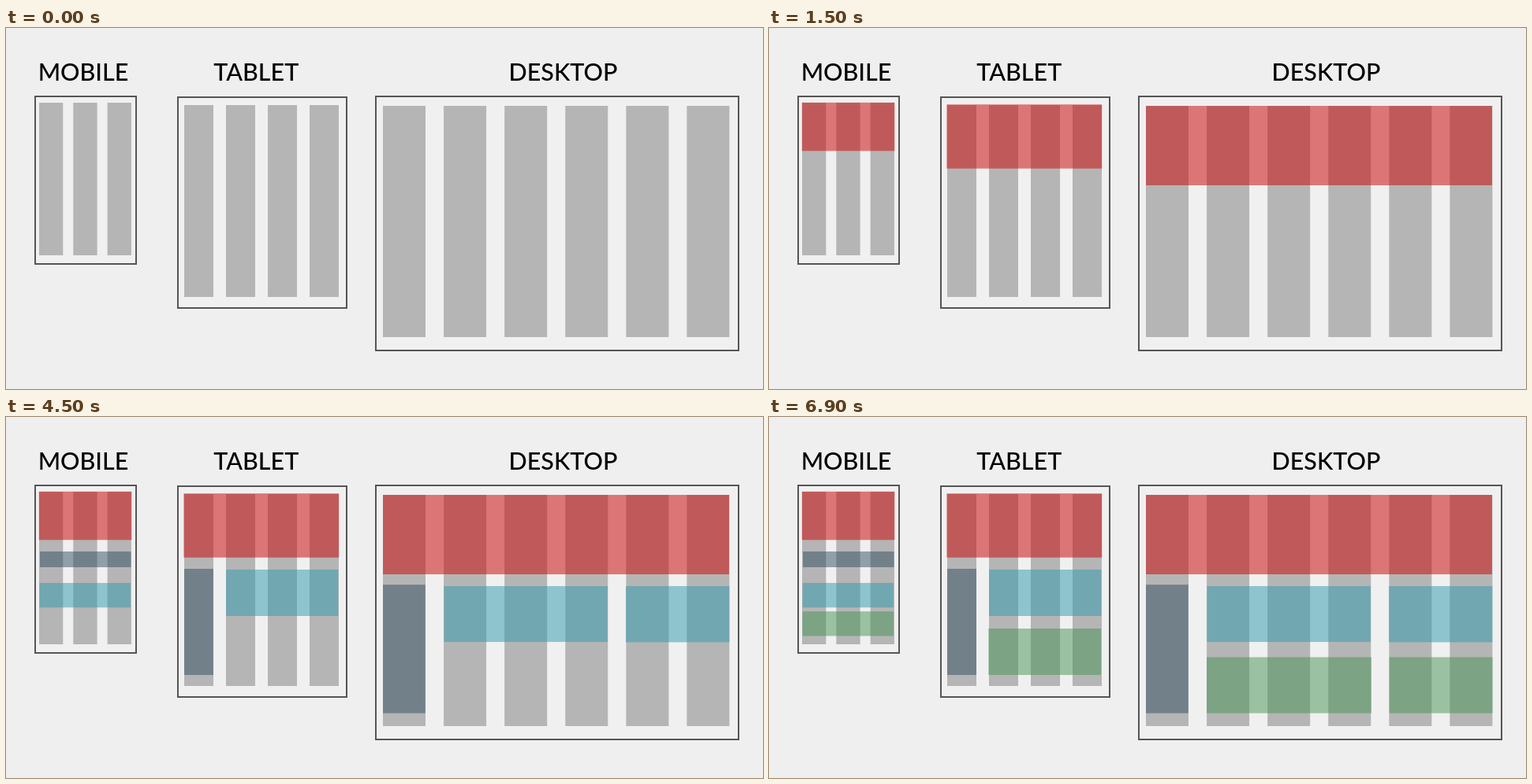
Recreate the animation shown at these times as an HTML page. Size 960 px wide and 459 px high, loop 7500 ms.

```html
<!DOCTYPE html>
<html lang="en">
<head>
<meta charset="utf-8">
<title>Responsive column grid</title>
<style>
  html, body { margin: 0; width: 100%; height: 100%; overflow: hidden; background: #efefef; }
  svg { display: block; width: 960px; height: 459px; }
  text { font: 500 30.5px Lato, sans-serif; text-anchor: middle; fill: #000; }
  .frame { fill: #f0f0f0; stroke: #555; stroke-width: 2; }
  .columns { fill: #b5b5b5; }
  .layer { visibility: hidden; animation: 7500ms step-end infinite; }
  .header { fill: rgba(204, 6, 6, .517); animation-name: from1500; }
  .nav { fill: rgba(37, 67, 89, .466); animation-name: from3000; }
  .content { fill: rgba(47, 153, 173, .5); animation-name: from4500; }
  .extra { fill: rgba(63, 144, 79, .49); animation-name: from6000; }
  @keyframes from1500 { 0% { visibility: hidden } 20%, 100% { visibility: visible } }
  @keyframes from3000 { 0% { visibility: hidden } 40%, 100% { visibility: visible } }
  @keyframes from4500 { 0% { visibility: hidden } 60%, 100% { visibility: visible } }
  @keyframes from6000 { 0% { visibility: hidden } 80%, 100% { visibility: visible } }
</style>
</head>
<body>
<svg viewBox="0 0 960 459">
  <text x="98" y="67">MOBILE</text>
  <text x="317.3" y="67">TABLET</text>
  <text x="706.5" y="67">DESKTOP</text>

  <g class="frame">
    <rect x="37" y="87" width="128" height="213"/>
    <rect x="218" y="88" width="214" height="268"/>
    <rect x="469" y="87" width="460" height="323"/>
  </g>

  <g class="columns">
    <path d="M42 95h30.3v194h-30.3z M85.3 95h30.3v194h-30.3z M128.6 95h30.3v194h-30.3z"/>
    <path d="M226 98h37v244h-37z M279 98h37v244h-37z M332 98h37v244h-37z M385 98h37v244h-37z"/>
    <path d="M478 99h54v294h-54z M555.1 99h54v294h-54z M632.2 99h54v294h-54z
             M709.3 99h54v294h-54z M786.4 99h54v294h-54z M863.4 99h54v294h-54z"/>
  </g>

  <g class="layer header">
    <rect x="41.8" y="94.8" width="117.5" height="61.5"/>
    <rect x="225.4" y="97.2" width="196.8" height="81.5"/>
    <rect x="478" y="99" width="439" height="101"/>
  </g>
  <g class="layer nav">
    <rect x="43" y="171" width="115.5" height="20"/>
    <rect x="226" y="193" width="37" height="135"/>
    <rect x="478" y="213.2" width="53.8" height="163.4"/>
  </g>
  <g class="layer content">
    <rect x="42.5" y="211" width="115.5" height="31.2"/>
    <rect x="279" y="194" width="142.3" height="59"/>
    <rect x="555.4" y="215" width="207.6" height="71"/>
    <rect x="786" y="215" width="131.4" height="71.4"/>
  </g>
  <g class="layer extra">
    <rect x="42.5" y="247.2" width="115.5" height="31.2"/>
    <rect x="278.3" y="269" width="142.7" height="59"/>
    <rect x="555" y="305.4" width="209" height="71.2"/>
    <rect x="786.6" y="305.4" width="131" height="71.2"/>
  </g>
</svg>
</body>
</html>
```
